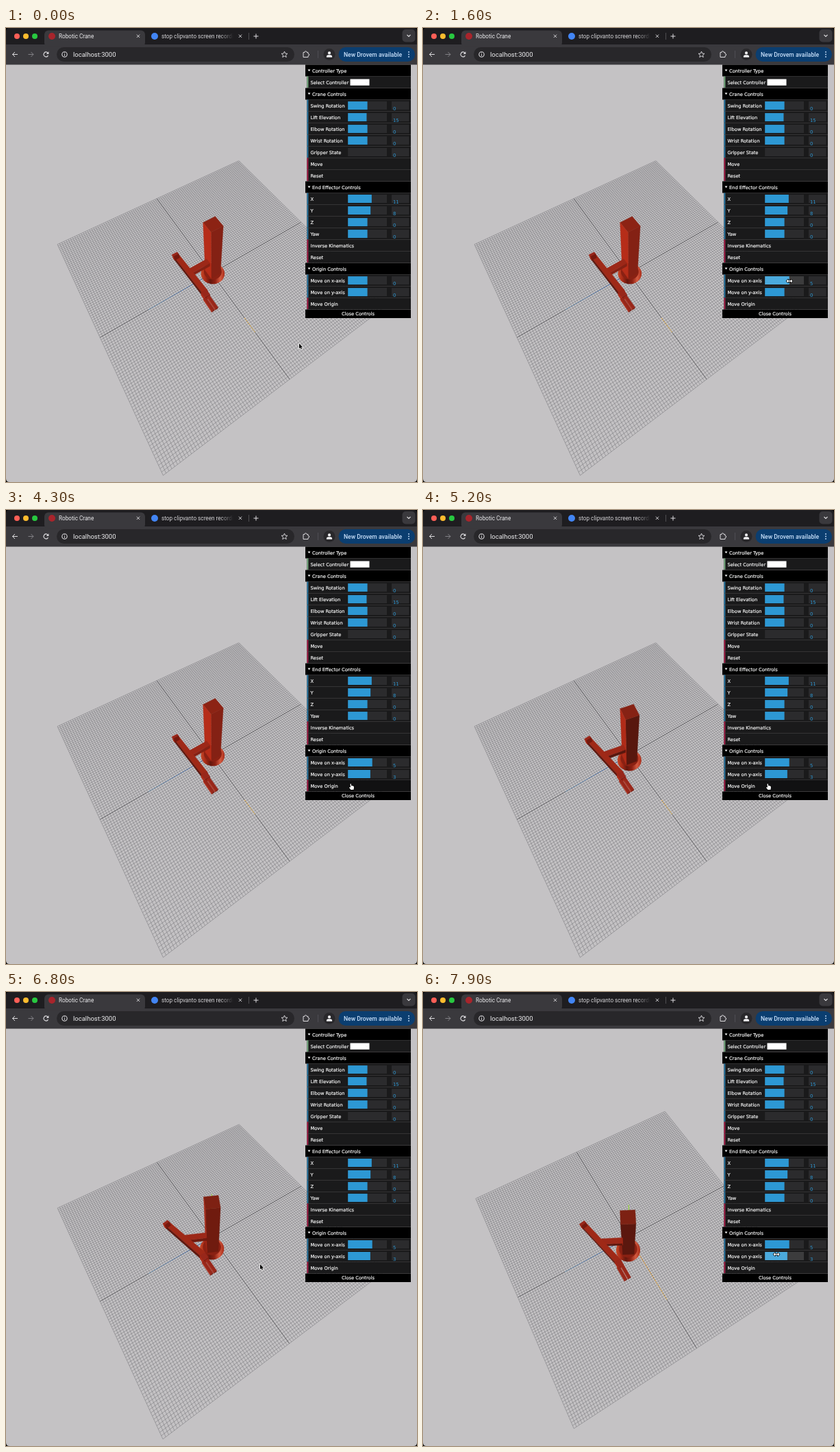
Write an HTML page with a canvas that moves like this. It is 600 px wide and 662 px high and loops after 8000 ms.

```html
<!DOCTYPE html>
<html lang="en">
<head>
<meta charset="utf-8">
<title>Robotic Crane</title>
<style>
html, body { margin: 0; width: 100%; height: 100%; overflow: hidden; background: #c4c2c4; }
canvas { display: block; width: 600px; height: 662px; }
</style>
</head>
<body>
<canvas id="stage"></canvas>
<script>
const W = 600, H = 662, LOOP = 8000;
const stage = document.getElementById('stage');
const ratio = window.devicePixelRatio || 1;
stage.width = W * ratio;
stage.height = H * ratio;
const g = stage.getContext('2d');
g.scale(ratio, ratio);

const UI = 'Roboto, "Liberation Sans", sans-serif';
const GUI = '"DejaVu Sans", sans-serif';
const RAD = Math.PI / 180;
const clamp = (v, a = 0, b = 1) => Math.min(b, Math.max(a, v));
const mix = (a, b, k) => a + (b - a) * k;
const smooth = k => k * k * (3 - 2 * k);

// Keys are [time, value, value, ...]
function track(keys, t, ease = k => k) {
  if (t <= keys[0][0]) return keys[0].slice(1);
  for (let i = 1; i < keys.length; i++) {
    const a = keys[i - 1], b = keys[i];
    if (t < b[0]) {
      const k = ease((t - a[0]) / (b[0] - a[0]));
      return a.slice(1).map((v, j) => mix(v, b[j + 1], k));
    }
  }
  return keys[keys.length - 1].slice(1);
}

const shade = (keys, k) => 'rgb(' + track(keys, k).map(Math.round).join(',') + ')';

// ---------- drawing helpers ----------
function rect(x, y, w, h, fill, r = 0) {
  g.fillStyle = fill;
  g.beginPath();
  g.roundRect(x, y, w, h, r);
  g.fill();
}
function disc(x, y, r, fill) {
  g.fillStyle = fill;
  g.beginPath();
  g.arc(x, y, r, 0, 7);
  g.fill();
}
function path(points, close) {
  g.beginPath();
  points.forEach(([x, y], i) => i ? g.lineTo(x, y) : g.moveTo(x, y));
  if (close) g.closePath();
}
function line(points, color, width = 1) {
  path(points);
  g.strokeStyle = color;
  g.lineWidth = width;
  g.stroke();
}
function poly(points, fill) {
  path(points, true);
  g.fillStyle = fill;
  g.fill();
}
function text(str, x, y, font, fill, align = 'left') {
  g.font = font;
  g.fillStyle = fill;
  g.textAlign = align;
  g.fillText(str, x, y);
}
function cross(x, y, r, color) {
  line([[x - r, y - r], [x + r, y + r]], color, 0.9);
  line([[x + r, y - r], [x - r, y + r]], color, 0.9);
}

// ---------- camera ----------
const FOCAL = 396, DIST = 114.6;
let ca, sa, ce, se, eye;
function aim(azimuth, elevation) {
  ca = Math.cos(azimuth * RAD);
  sa = Math.sin(azimuth * RAD);
  ce = Math.cos(elevation * RAD);
  se = Math.sin(elevation * RAD);
  eye = [DIST * ce * sa, DIST * se, DIST * ce * ca];
}
function project([x, y, z]) {
  const u = x * ca - z * sa, v = -x * sa - z * ca;
  const d = DIST + v * ce - y * se;
  return [300.4 + FOCAL * u / d, 357.8 - FOCAL * (v * se + y * ce) / d];
}

// ---------- scene ----------
function grid() {
  g.beginPath();
  for (let i = -50; i <= 50; i++) {
    if (!i) continue;
    for (const ends of [[[i, 0, -50], [i, 0, 50]], [[-50, 0, i], [50, 0, i]]]) {
      g.moveTo(...project(ends[0]));
      g.lineTo(...project(ends[1]));
    }
  }
  g.strokeStyle = 'rgba(88,88,92,.7)';
  g.lineWidth = 0.55;
  g.stroke();
  line([project([0, 0, -50]), project([0, 0, 50])], '#414144', 0.8);
  line([project([-50, 0, 0]), project([50, 0, 0])], '#414144', 0.8);
}

function axis(dir, from, start, end, dash, width) {
  const a = project([0, 0, 0]), b = project(dir.map(v => v * 30));
  const color = g.createLinearGradient(...a, ...b);
  color.addColorStop(0, start);
  color.addColorStop(1, end);
  g.setLineDash(dash);
  line([project(dir.map(v => v * 30 * from)), b], color, width);
  g.setLineDash([]);
}

function frame(yaw, pitch = 0) {
  const c = Math.cos(yaw * RAD), s = Math.sin(yaw * RAD);
  const cp = Math.cos(pitch * RAD), sp = Math.sin(pitch * RAD);
  return [[c * cp, sp, s * cp], [-c * sp, cp, -s * sp], [-s, 0, c]];
}
const along = (p, dir, k) => p.map((v, i) => v + dir[i] * k);

// colors: faces across the x, y and z axes of the box
function box(center, half, axes, colors) {
  for (let i = 0; i < 3; i++) {
    for (const s of [-1, 1]) {
      const mid = along(center, axes[i], s * half[i]);
      const facing = axes[i].reduce((sum, n, k) => sum + s * n * (eye[k] - mid[k]), 0);
      if (facing <= 0) continue;
      const j = (i + 1) % 3, k = (i + 2) % 3;
      const corners = [[1, 1], [1, -1], [-1, -1], [-1, 1]].map(([p, q]) =>
        project(along(along(mid, axes[j], p * half[j]), axes[k], q * half[k])));
      poly(corners, colors[i]);
      path(corners, true);
      g.strokeStyle = colors[i];
      g.lineWidth = 0.4;
      g.stroke();
    }
  }
}

function ring(center, r, fill) {
  const pts = [];
  for (let i = 0; i < 40; i++) {
    const a = i * Math.PI / 20;
    pts.push(project([center[0] + r * Math.cos(a), center[1], center[2] + r * Math.sin(a)]));
  }
  poly(pts, fill);
}

function crane(p) {
  const base = [0.25 + 4.6 * p, 0, -0.35 + 3.45 * p];
  const turn = frame(28 * p);
  const up = y => [base[0], y, base[2]];
  const [bx] = project(base);

  const metal = g.createLinearGradient(bx - 18, 0, bx + 18, 0);
  ['#c94a28', '#a92b17', '#64170d', '#8d2113', '#d35a40', '#a52916']
    .forEach((c, i) => metal.addColorStop(i / 5, c));
  ring(base, 5, metal);
  ring(up(1.6), 3.7, '#8a2113');

  // The front face passes through its own shadow while turning
  const front = shade([[0, 132, 33, 20], [0.76, 45, 13, 8], [0.91, 112, 27, 15], [1, 84, 21, 13]], p);
  const side = shade([[0, 182, 45, 25], [1, 166, 41, 23]], p);
  const top = shade([[0, 140, 35, 20], [1, 125, 33, 19]], p);
  box(up(17.2), [2.3, 15.7, 2.3], turn, [front, top, side]);

  const limb = ['#75190e', '#98271a', '#ad2c19'];
  box(along(up(11), turn[2], 6), [1.1, 1.1, 3.9], turn, [front, '#9c2818', '#b02c19']);

  const hub = along(up(11), turn[2], 10.6);
  const beam = frame(-11 * p, 13.5);
  box(hub, [11.6, 1.1, 1.1], beam, [limb[0], '#9f2917', '#5e170e']);
  box(along(hub, beam[0], -11.2), [0.6, 1.15, 1.15], beam, limb);

  const tip = along(hub, beam[0], 11.4);
  const flat = frame(0);
  box([tip[0] + 0.4, tip[1] - 1, tip[2]], [1.1, 1.4, 1.1], flat, limb);
  for (const off of [-0.75, 0.75])
    box([tip[0] + 3.7, tip[1] - 2.3, tip[2] + off], [2.7, 0.6, 0.55], flat, limb);
}

function scene(t) {
  rect(0, 53, W, H - 53, '#c4c2c4');
  const [az, el] = track([[6700, 57, 61.9], [6800, 57.1, 62.1], [6900, 57.7, 64],
    [7100, 59.2, 68.3], [7200, 59.9, 69.5], [7300, 60.1, 69.8]], t);
  aim(az, el);
  grid();
  axis([0, 0, 1], 0.08, '#1f63e6', '#7cc0f2', [2, 1.4], 0.8);
  if (t < 6700 || t >= 6900)
    axis([1, 0, 0], t < 6700 ? 0.78 : t < 7250 ? 0.9 : 0.12, '#eda050', '#f2c768', [2, 1.4], 1.3);
  axis([0, 1, 0], 0, '#2fd02f', '#9be02a', [], 1);
  crane(t < 4800 ? 0 : 1 - Math.exp((4800 - t) / 830));
}

// ---------- browser window ----------
function browser() {
  const ink = '#dedde0', bar = '#3a393d';
  rect(0, 0, W, 25, '#1e1d20');
  rect(0, 24, W, 29.5, bar);
  ['#ff5f57', '#febc2e', '#28c840'].forEach((c, i) => disc(16 + 13 * i, 12, 4, c));

  rect(56, 3.5, 147, 24, bar, 6);
  disc(67, 12, 5, '#a8252c');
  text('Robotic Crane', 77, 14.6, '8.2px ' + UI, '#ececee');
  cross(193, 11.8, 2.2, ink);
  disc(217, 12, 5, '#4285f4');
  const fade = g.createLinearGradient(312, 0, 332, 0);
  fade.addColorStop(0, '#d4d3d6');
  fade.addColorStop(1, 'rgba(212,211,214,0)');
  text('stop clipvanto screen recordi', 227, 14.6, '8.2px ' + UI, fade);
  cross(342, 11.8, 2.2, ink);
  line([[354.5, 7], [354.5, 17]], '#5b5a5e', 0.8);
  line([[361.5, 12], [368.5, 12]], ink);
  line([[365, 8.5], [365, 15.5]], ink);
  rect(578.5, 2, 19, 18.5, bar, 5);
  line([[585.5, 10], [588, 12.5], [590.5, 10]], ink, 1.1);

  line([[17, 38.5], [9.5, 38.5]], ink);
  line([[13, 35], [9.5, 38.5], [13, 42]], ink);
  line([[32.5, 38.5], [40, 38.5]], '#828186');
  line([[36.5, 35], [40, 38.5], [36.5, 42]], '#828186');
  g.strokeStyle = ink;
  g.lineWidth = 1.1;
  g.beginPath();
  g.arc(58.5, 38.5, 3.4, 0.5, 5.5);
  g.stroke();
  poly([[62.4, 34.3], [62.4, 38], [58.8, 38]], ink);

  rect(74, 28, 347, 21, '#28272a', 10.5);
  g.beginPath();
  g.arc(85.5, 38.5, 3.7, 0, 7);
  g.stroke();
  line([[85.5, 38], [85.5, 40.7]], ink);
  disc(85.5, 36.5, 0.6, ink);
  text('localhost:3000', 98, 41.7, '9.5px ' + UI, '#efeff1');

  const star = [];
  for (let i = 0; i < 10; i++) {
    const a = i * Math.PI / 5 - Math.PI / 2, r = i % 2 ? 2.1 : 4.7;
    star.push([406.5 + r * Math.cos(a), 38.8 + r * Math.sin(a)]);
  }
  path(star, true);
  g.lineWidth = 0.9;
  g.stroke();

  // Puzzle piece: a square with two bumps
  g.beginPath();
  g.moveTo(434, 42.5);
  g.lineTo(434, 35.6);
  g.lineTo(436, 35.6);
  g.arc(437.4, 35.2, 1.4, Math.PI, 0);
  g.lineTo(441, 35.6);
  g.lineTo(441, 37.7);
  g.arc(441.2, 39, 1.4, -Math.PI / 2, Math.PI / 2);
  g.lineTo(441, 42.5);
  g.closePath();
  g.lineWidth = 1;
  g.stroke();
  line([[455.5, 33], [455.5, 44]], '#55545a', 0.8);
  disc(472, 38.5, 8.5, '#29282b');
  disc(472, 36.4, 2.1, '#f1f1f3');
  rect(467.8, 39.3, 8.4, 3.4, '#f1f1f3', [3, 3, 0.5, 0.5]);

  rect(485.5, 28, 111.5, 21, '#0b3e70', 10.5);
  text('New Drovem available', 493, 41.5, '500 8.6px ' + UI, '#c9e1fb');
  for (const y of [35, 38.5, 42]) disc(588, y, 0.9, '#c9e1fb');
}

// ---------- control panel ----------
const BLUE = '#2d98d4';
const ROWS = [
  ['#', 'Controller Type'], ['=', 'Select Controller'],
  ['#', 'Crane Controls'],
  ['n', 'Swing Rotation', 0, .5], ['n', 'Lift Elevation', 15, .48], ['n', 'Elbow Rotation', 0, .5],
  ['n', 'Wrist Rotation', 0, .5], ['n', 'Gripper State', 0, 0], ['f', 'Move'], ['f', 'Reset'],
  ['#', 'End Effector Controls'],
  ['n', 'X', 11, .61], ['n', 'Y', 8, .58], ['n', 'Z', 0, .5], ['n', 'Yaw', 0, .5],
  ['f', 'Inverse Kinematics'], ['f', 'Reset'],
  ['#', 'Origin Controls'], ['n', 'Move on x-axis'], ['n', 'Move on y-axis'], ['f', 'Move Origin']
];
const EDGE = { '=': '#7fb98a', n: '#2c7fae', f: '#b01e4c' };
const FONT = '6.7px ' + GUI;

function label(str, x, y, align) {
  text(str, x, y, FONT, '#f2f2f2', align);
  g.strokeStyle = '#f2f2f2';
  g.lineWidth = 0.2;
  g.strokeText(str, x, y);
}

function panel(t, mouse) {
  const origin = [
    Math.round(5 * clamp((t - 1100) / 450)),
    Math.round(3 * clamp((t - 2500) / 600))
  ];
  ROWS.forEach(([kind, name, value, level], i) => {
    const y = 53.5 + 17 * i;
    const over = mouse.x > 440 && mouse.x < 591 && mouse.y >= y && mouse.y < y + 17;
    if (kind === '#') {
      rect(437, y, 154, 17, '#000');
      poly([[440.6, y + 7], [444.4, y + 7], [442.5, y + 9.8]], '#fff');
      label(name, 447, y + 11);
      return;
    }
    // The folder indent lets the scene show through on the left
    rect(439.5, y, 151.5, 17, '#2b2b2c');
    rect(439.5, y, 151.5, 16.4, kind === 'f' && over ? '#111112' : '#1a1a1b');
    rect(439.5, y, 1.8, 16.4, EDGE[kind]);
    label(name, 444.5, y + 11);
    if (kind === '=') {
      rect(502.5, y + 4, 28, 9.3, '#fff');
      line([[525, y + 8], [526.5, y + 9.5], [528, y + 8]], '#e4e4e4', 0.6);
    }
    if (kind !== 'n') return;
    if (i === 18 || i === 19) {
      value = origin[i - 18];
      level = 0.5 + value / 40;
    }
    const hot = over && mouse.x > 499 && mouse.x < 556;
    rect(499.2, y + 2.6, 56.8, 12, hot ? '#3c3c3d' : '#2b2b2d');
    rect(499.2, y + 2.6, 56.8 * level, 12, hot ? '#4baadd' : BLUE);
    rect(563, y + 2.6, 25.5, 12, '#2b2b2d');
    text(String(value), 565, y + 15.8, '6.8px ' + GUI, BLUE);
  });
  rect(437, 410.5, 154, 12.5, '#000');
  label('Close Controls', 514, 419, 'center');
}

// ---------- pointer ----------
function pointer(t) {
  const [x, y] = track([[0, 428, 460], [250, 431, 462], [550, 470, 420], [850, 520, 378],
    [1000, 527, 369], [1100, 527, 369], [1550, 535, 369], [1950, 535, 369], [2350, 527, 386],
    [2500, 527, 386], [3100, 533, 386], [3500, 533, 386], [4000, 504, 403.5],
    [6400, 504, 403.5], [6700, 371, 397], [6800, 371, 397], [7100, 368, 406],
    [7250, 367, 409], [7350, 367, 409], [7800, 516, 382.5], [8000, 516, 382.5]], t, smooth);
  const row = ROWS[Math.floor((y - 53.5) / 17)];
  let kind = 'arrow';
  if (row && x > 440 && x < 591) {
    if (row[0] === 'n' && x > 499 && x < 556) kind = 'resize';
    if (row[0] === 'f') kind = 'hand';
  }
  return { x, y, kind };
}

function outlined(points, fill, edge) {
  path(points, true);
  g.lineJoin = 'round';
  g.strokeStyle = edge;
  g.lineWidth = 1.4;
  g.stroke();
  g.fillStyle = fill;
  g.fill();
  g.lineJoin = 'miter';
}

function drawPointer({ x, y, kind }) {
  g.save();
  g.translate(x, y);
  if (kind === 'arrow') {
    outlined([[0, 0], [0, 7.6], [1.7, 6.1], [2.8, 8.6], [4, 8.1], [2.9, 5.6], [5.2, 5.5]],
      '#000', '#fff');
  } else if (kind === 'resize') {
    outlined([[-4.5, 0], [-2, -2.4], [-2, -0.7], [2, -0.7], [2, -2.4], [4.5, 0],
      [2, 2.4], [2, 0.7], [-2, 0.7], [-2, 2.4]], '#fff', '#000');
  } else {
    outlined([[-1.6, -4], [-0.4, -4.4], [0.3, -1.3], [1.6, -1.6], [3.4, -0.8], [4, 0.2],
      [3.6, 4.2], [-0.4, 4.6], [-3, 1.4], [-2.4, 0.4], [-1, 1]], '#fff', '#000');
  }
  g.restore();
}

function corners() {
  g.fillStyle = '#000';
  for (const [x, y, dx, dy] of [[0, H, 1, -1], [W, H, -1, -1], [0, 0, 1, 1], [W, 0, -1, 1]]) {
    g.beginPath();
    g.moveTo(x, y);
    g.lineTo(x + 5 * dx, y);
    g.quadraticCurveTo(x, y, x, y + 5 * dy);
    g.fill();
  }
}

const began = performance.now();
function draw() {
  const t = (performance.now() - began) % LOOP;
  const mouse = pointer(t);
  scene(t);
  browser();
  panel(t, mouse);
  drawPointer(mouse);
  corners();
  requestAnimationFrame(draw);
}
draw();
</script>
</body>
</html>
```
